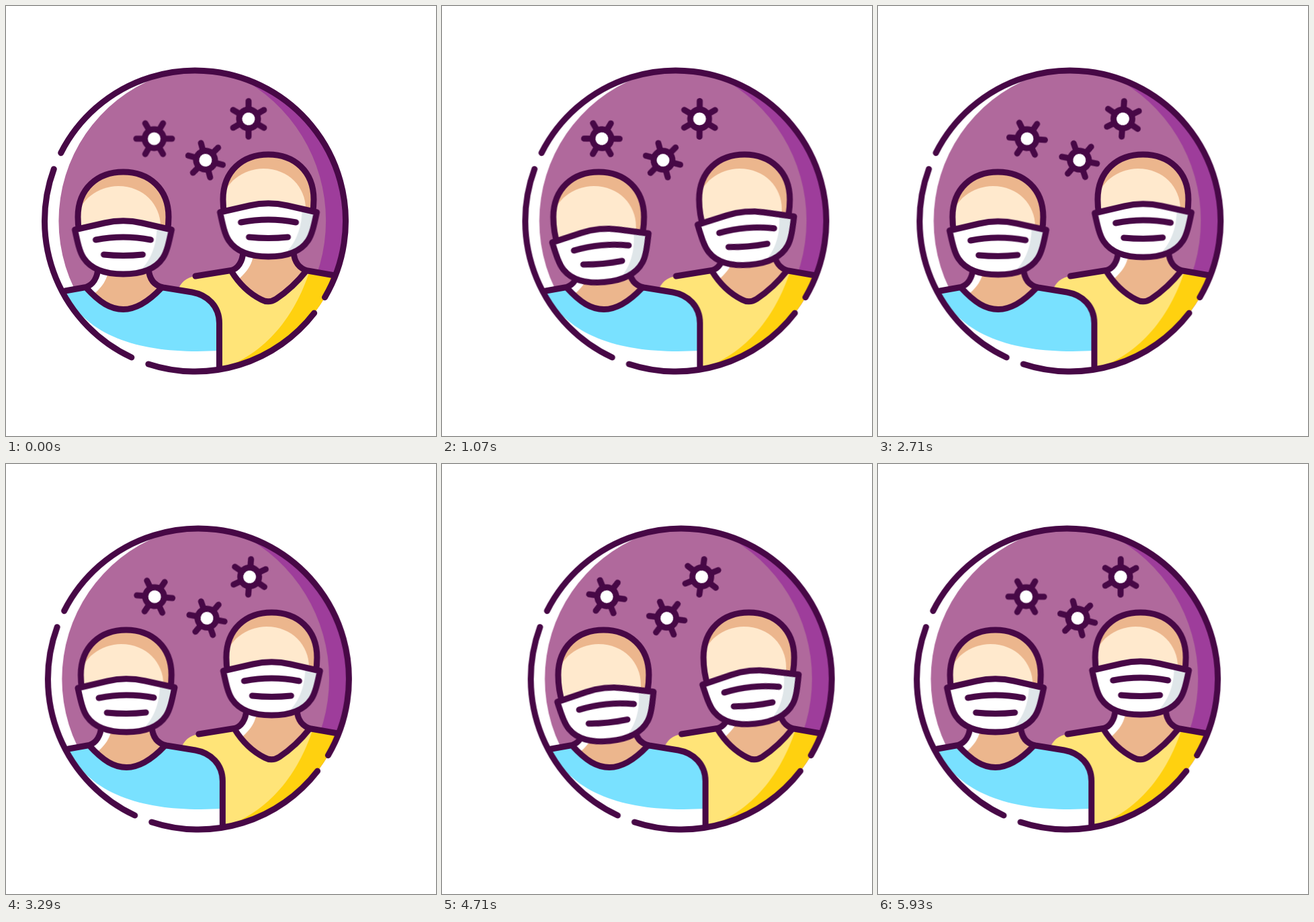
An HTML page for the animation above (6 s loop, 640x640 px).

```html
<!DOCTYPE html>
<html lang="en">
<head>
<meta charset="utf-8">
<title>Masked pair</title>
<style>
  html, body { margin: 0; width: 100%; height: 100%; overflow: hidden; background: #fff; }
  svg { display: block; width: 100vw; height: 100vh; }
  .line { fill: none; stroke: #470846; stroke-width: 9; stroke-linecap: round; stroke-linejoin: round; }
  .white { fill: #fff; }
  .skin { fill: #ecb68d; }
  .glow { fill: #ffe9cd; }
  .shade { fill: #dfe6e9; }
  .plum { fill: #b0699c; }
  .violet { fill: #9e3d9b; }
  .lemon { fill: #ffe478; }
  .gold { fill: #ffd10f; }
  .sky { fill: #79e1ff; }
</style>
</head>
<body>
<svg viewBox="0 0 640 640">
  <defs>
    <clipPath id="disc"><circle cx="281.5" cy="320" r="224"/></clipPath>

    <path id="skull" d="M114 358Q107 336 107 314C107 272 136 247 174.5 247C213 247 242 272 242 314Q242 336 235 358"/>
    <clipPath id="inSkull"><use href="#skull"/></clipPath>
    <g id="head">
      <use href="#skull" class="skin"/>
      <path class="glow" clip-path="url(#inSkull)" d="M107 318C107 289 138 268 167 268C205 268 230 296 230 328V360H107Z"/>
      <use href="#skull" class="line"/>
    </g>

    <path id="cloth" d="M-72 0L-28 -10Q0 -16.500 28 -10L72 0C68 19 65 33 59 42C47 60 26 66 0 66C-26 66 -47 60 -59 42C-65 33 -68 19 -72 0Z"/>
    <clipPath id="inCloth"><use href="#cloth"/></clipPath>
    <g id="mask">
      <use href="#cloth" class="white"/>
      <path class="shade" clip-path="url(#inCloth)" d="M50 -10C51 25 40 50 16 70H80V-10Z"/>
      <use href="#cloth" class="line"/>
      <path class="line" d="M-41 15Q0 7 41 15M-29 37Q0 40 29 37"/>
    </g>

    <path id="neckL" d="M137 385C137 404 129 415 119 418.500C140 442 156 451.500 174.500 451.500C193 451.500 212 440 231 419C220 415 212 406 212 385Z"/>
    <clipPath id="inNeckL"><use href="#neckL"/></clipPath>
    <path id="neckR" d="M353 360C353 380 345 391 335 394C349 417 364 429 380 437Q391 443 402 436C420 424 436 408 447 394C436 390 428 380 428 360Z"/>
    <clipPath id="inNeckR"><use href="#neckR"/></clipPath>

    <path id="shirt" d="M88 424L119 418.500H231L277 426C300 430 317.500 447 317.500 472V550H88Z"/>
    <clipPath id="inShirt"><use href="#shirt"/></clipPath>

    <g id="virus" class="line"></g>
  </defs>

  <g class="scene">
    <g clip-path="url(#disc)">
      <rect class="violet" x="281" y="90" width="230" height="460"/>
      <path class="plum" d="M225 90V106A229.500 229.500 0 0 0 225 534H345A241 241 0 0 0 345 105V90Z"/>
    </g>
  </g>

  <g transform="translate(220.5 197.5)"><g id="v1"><g class="cw"><use href="#virus"/></g></g></g>
  <g transform="translate(361 168)"><g id="v2"><g class="cw"><use href="#virus" transform="rotate(30)"/></g></g></g>
  <g transform="translate(297 229.5)"><g id="v3"><g class="ccw"><use href="#virus" transform="rotate(15)"/></g></g></g>

  <g class="scene">
    <g clip-path="url(#disc)">
      <path class="lemon" d="M255 425Q262 404 283 402L335 394H447L490 401L515 560H255Z"/>
      <path class="gold" d="M452 394C434 450 395 515 320 540L515 560V404Z"/>
      <use href="#neckR" class="white"/>
      <path class="skin" clip-path="url(#inNeckR)" d="M369 360C369 385 358 397 340 412V460H460V360Z"/>
      <use href="#shirt" class="white"/>
      <path class="sky" clip-path="url(#inShirt)" d="M84 415L90 428C120 490 195 514 285 514L320 513V410Z"/>
      <use href="#neckL" class="white"/>
      <path class="skin" clip-path="url(#inNeckL)" d="M153 385C153 407 142 421 124 434V470H250V385Z"/>
    </g>
    <path class="line" d="M282 402L335 393.500C345 391 352 381 353 366M428 366C429 381 437 391 449 394L489 401M335 394C349 417 364 429 380 437Q391 443 402 436C420 424 436 408 447 394"/>
    <path class="line" d="M88 424L119 418.500C129 415 136 405 137 390M212 390C213 406 220 416 234 419L277 426C300 430 317.500 447 317.500 472V540M119 419C140 442 156 451.500 174.500 451.500C193 451.500 212 440 231 420"/>
    <path class="line" id="rim"/>

    <g id="headR"><use href="#head" x="216" y="-26"/></g>
    <g id="headL"><use href="#head"/></g>
    <g transform="translate(390.5 307)"><g id="dropR"><g id="tiltR"><use href="#mask"/></g></g></g>
    <g transform="translate(174.5 333)"><g id="dropL"><g id="tiltL"><use href="#mask"/></g></g></g>
  </g>
</svg>
<script>
  const LOOP = 3000;
  const STD = 'cubic-bezier(.49,0,.49,1)';
  const SLOW = 'cubic-bezier(.7,0,.65,1)';
  const MID = 'cubic-bezier(.52,0,.55,1)';

  const $ = id => document.getElementById(id);

  // Outline of the disc: arcs in degrees, clockwise, with gaps between them
  const at = deg => {
    const a = deg * Math.PI / 180;
    return `${281.5 + 224 * Math.cos(a)} ${320 + 224 * Math.sin(a)}`;
  };
  $('rim').setAttribute('d', [[206.9, 390.5], [37.7, 108.1], [115, 200.2]]
    .map(([a, b]) => `M${at(a)}A224 224 0 ${b - a > 180 ? 1 : 0} 1 ${at(b)}`).join(''));

  const spokes = [0, 60, 120, 180, 240, 300]
    .map(a => `<path d="M15 0H26.5" transform="rotate(${a})"/>`).join('');
  $('virus').innerHTML = spokes + '<circle class="white" r="14"/>';

  // Swing from rest to the far pose and back; go/stop delimit the outward move in ms
  function swing(selector, pose, { out = STD, back = STD, go = 0, stop = 1500 } = {}) {
    const rest = pose.replace(/-?[\d.]+/g, '0');
    const frames = [
      { offset: 0, transform: rest },
      { offset: go / LOOP, transform: rest, easing: out },
      { offset: stop / LOOP, transform: pose },
      { offset: .5, transform: pose, easing: back },
      { offset: 1, transform: rest }
    ];
    for (const el of document.querySelectorAll(selector)) {
      el.animate(frames, { duration: LOOP, iterations: Infinity }).startTime = 0;
    }
  }

  const LATE = { go: 500, stop: 1380 };
  const moves = [
    ['.scene', 'translate(77px, 0px)'],
    ['#v1', 'translate(25.5px, 0px)', { out: SLOW }],
    ['#v2', 'translate(26px, 0px)', { back: SLOW }],
    ['#v3', 'translate(38.7px, 0px)', { out: MID, back: MID }],
    ['.cw', 'rotate(70deg)'],
    ['.ccw', 'rotate(-70deg)'],
    ['#headL', 'translate(-9px, 0px)'],
    ['#headR', 'translate(-8.7px, 0px)', LATE],
    ['#dropL', 'translate(0px, 14px)', { go: 550, stop: 1270 }],
    ['#tiltL', 'translate(-6px, 0px) rotate(-6.2deg)'],
    ['#dropR', 'translate(0px, 14.4px)'],
    ['#tiltR', 'translate(-6px, 0px) rotate(-6.2deg)', LATE]
  ];
  moves.forEach(m => swing(...m));
</script>
</body>
</html>
```
